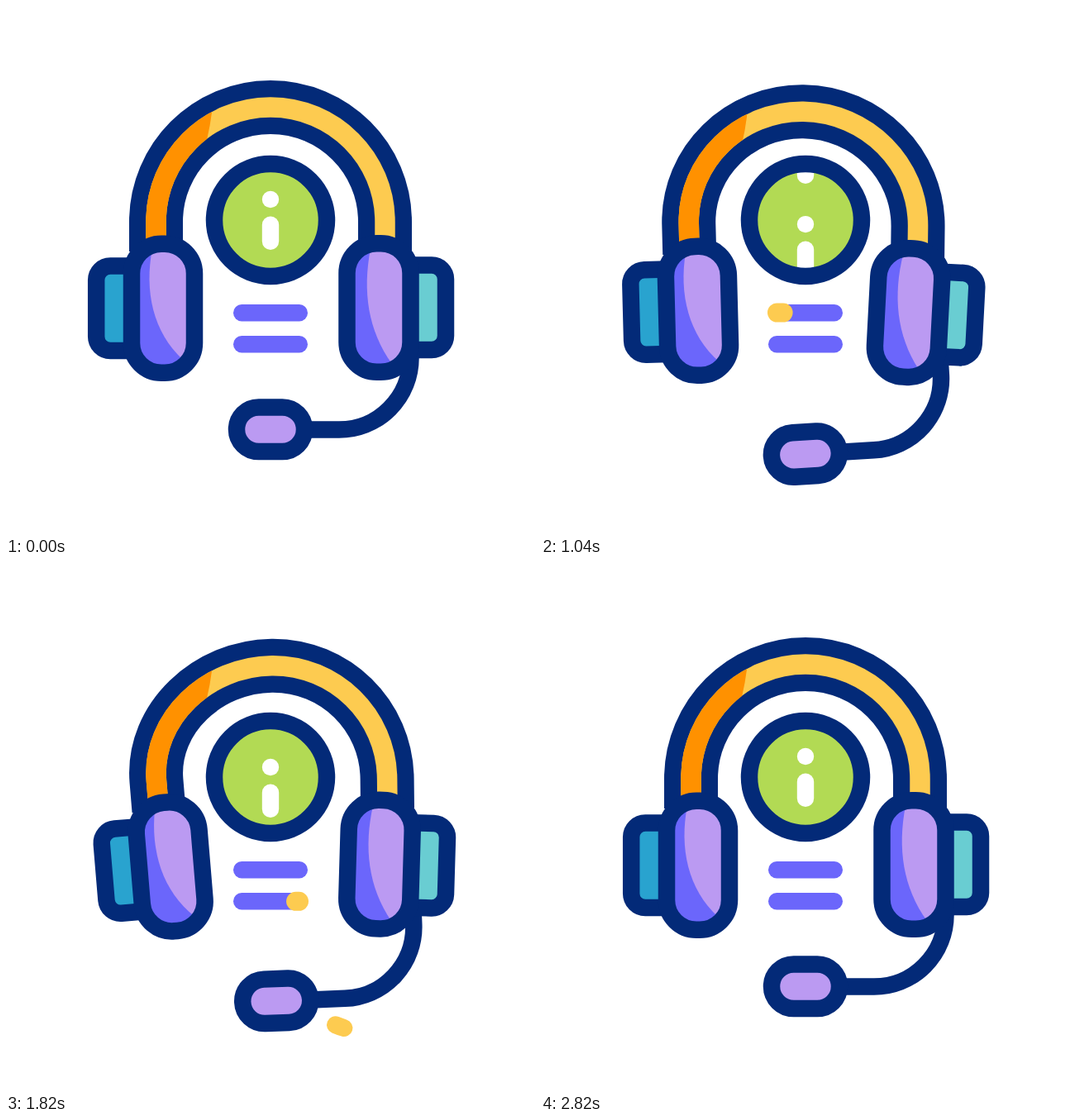
These frames come from a looping animation (640x640 px, 3.2 s). An HTML page:

```html
<!DOCTYPE html>
<html lang="en">
<head>
<meta charset="utf-8">
<title>Headset support</title>
<style>
html, body { margin: 0; width: 100%; height: 100%; overflow: hidden; background: #fff; }
svg { display: block; width: 100vw; height: 100vh; }
.ink { stroke: #032a78; stroke-width: 20.5; }
.none { fill: none; }
.violet { fill: #6b66fb; }
.lilac { fill: #bb9af2; }
.spark { fill: none; stroke: #fdcb50; stroke-width: 21; stroke-linecap: round; }
.wide { stroke-width: 23; }
</style>
</head>
<body>
<svg viewBox="0 0 640 640">
  <defs>
    <clipPath id="shade"><path id="shadeEdge" d="M0 0H255L249 129Q247 145 243 162L230 400H0Z"/></clipPath>
    <clipPath id="lens"><circle cx="320" cy="259" r="60"/></clipPath>
    <g id="letter" fill="#fff">
      <circle cx="320" cy="234" r="10.2"/>
      <rect x="309.8" y="254.5" width="20.4" height="40.5" rx="10.2"/>
    </g>
  </defs>

  <circle cx="320" cy="259" r="60" fill="#b2da54"/>
  <g clip-path="url(#lens)">
    <g id="scroll"><use href="#letter"/><use href="#letter" y="-110"/></g>
  </g>
  <circle class="ink none" cx="320" cy="259" r="68"/>
  <rect class="violet" x="275" y="361" width="90" height="20.4" rx="10.2"/>
  <rect class="violet" x="275" y="399" width="90" height="20.4" rx="10.2"/>
  <path id="line1" class="spark wide" pathLength="1" d="M285.5 371H354.5"/>
  <path id="line2" class="spark wide" pathLength="1" d="M285.5 409.3H354.5"/>

  <g id="mic">
    <path class="ink none" d="M489.5 400V426A86.5 86.5 0 0 1 403 512.5H362"/>
    <rect class="ink lilac" x="279" y="485.5" width="82" height="53.5" rx="26.7"/>
    <path id="spark1" class="spark" pathLength="1" d="M288 478L260 444"/>
    <path id="spark2" class="spark" pathLength="1" d="M267 497L224 483"/>
    <path id="spark3" class="spark" pathLength="1" d="M268 524L227 537"/>
  </g>

  <path id="band" class="none" stroke="#032a78" stroke-width="65"/>
  <path id="bandLight" class="none" stroke="#fdcb50" stroke-width="24.5"/>
  <g clip-path="url(#shade)"><path id="bandDark" class="none" stroke="#ff9100" stroke-width="24.5"/></g>

  <g id="left">
    <rect class="ink" fill="#29a3cf" x="109.2" y="314.5" width="60" height="102.5" rx="17"/>
    <rect class="violet" x="152" y="287.8" width="76" height="156" rx="36"/>
    <path class="lilac" d="M177 294C167 345 178 395 214 428L219 425V294Z"/>
    <rect class="ink none" x="152" y="287.8" width="76" height="156" rx="36"/>
  </g>
  <g id="right">
    <rect class="ink" fill="#69cdd2" x="472" y="313.5" width="60" height="102.5" rx="17"/>
    <rect class="violet" x="412.5" y="287.3" width="77" height="155.5" rx="36"/>
    <path class="lilac" d="M441 294C431 345 438 393 467 433L478 430L482 400V294Z"/>
    <rect class="ink none" x="412.5" y="287.3" width="77" height="155.5" rx="36"/>
  </g>

  <path id="swoosh1" class="spark" pathLength="1" d=""/>
  <path id="swoosh2" class="spark" pathLength="1" d=""/>
</svg>
<script>
const LOOP = 3200;
const $ = id => document.getElementById(id);
const rad = deg => deg * Math.PI / 180;

// time, then x, y, angle of the left cup, the right cup and the microphone
const poses = [
  [260, 0, 0, 0, 0, 0, 0, 0, 0, 0],
  [460, -.8, -16, -3.5, .6, -16, 2, -2, -8, -3.5],
  [560, 0, -22.5, -5, 1, -22.5, 2.5, 0, -8, -5],
  [800, 2.4, 6.2, -9.9, 7.5, -5, 2.8, 6, 22, -12],
  [1040, -2.7, 3.5, -1.5, -1, 7, 3, -5.5, 25, -3.5],
  [1310, -2, -22.5, 3, 0, -22.5, 1, 0, -6, 2],
  [1540, 2.4, 7.4, -7.2, 6.6, -3.8, 1, 7, 4, 3],
  [2140, -1.8, -1.7, -1, .5, 1.8, 2.5, 0, 21, -8.5],
  [2420, 0, 0, 0, 0, 0, 0, 0, 13, -5],
  [2790, 0, 0, 0, 0, 0, 0, 0, 0, 0]
];

const slope = (i, k) => (poses[i + 1][k] - poses[i][k]) / (poses[i + 1][0] - poses[i][0]);

// Tangent that never overshoots a key
function tangent(i, k) {
  if (i === 0 || i === poses.length - 1) return 0;
  const a = slope(i - 1, k), b = slope(i, k);
  return a * b <= 0 ? 0 : 2 * a * b / (a + b);
}

function pose(t) {
  const end = poses.length - 1;
  if (t <= poses[0][0]) return poses[0];
  if (t >= poses[end][0]) return poses[end];
  const i = poses.findIndex(p => p[0] > t) - 1;
  const p = poses[i], q = poses[i + 1], d = q[0] - p[0];
  const u = (t - p[0]) / d, v = 1 - u;
  return p.map((a, k) =>
    a * v * v * (1 + 2 * u) + q[k] * u * u * (3 - 2 * u) +
    d * u * v * (v * tangent(i, k) - u * tangent(i + 1, k)));
}

function ease(t, from, to) {
  const u = Math.min(1, Math.max(0, (t - from) / (to - from)));
  return (1 - Math.cos(Math.PI * u)) / 2;
}

function trim(id, t, headFrom, headTo, tailFrom, tailTo) {
  const el = $(id), on = t > headFrom && t < tailTo + 12;
  el.style.display = on ? '' : 'none';
  if (!on) return;
  const tail = Math.min(.998, ease(t, tailFrom, tailTo));
  const len = Math.max(.001, ease(t, headFrom, headTo) - tail);
  el.setAttribute('stroke-dasharray', len + ' 3');
  el.setAttribute('stroke-dashoffset', -tail);
}

function arc(id, cx, cy, r, from, to) {
  const at = a => `${cx + r * Math.cos(rad(a))} ${cy + r * Math.sin(rad(a))}`;
  $(id).setAttribute('d', `M${at(from)}A${r} ${r} 0 0 ${to > from ? 1 : 0} ${at(to)}`);
}

function place(id, x, y, angle, px, py) {
  $(id).setAttribute('transform', `translate(${x} ${y}) rotate(${angle} ${px} ${py})`);
}

function spin(px, py, a, x, y) {
  const c = Math.cos(rad(a)), s = Math.sin(rad(a));
  return [px + x * c - y * s, py + x * s + y * c];
}

// The left leg leans with its cup, the right leg with the whole band
function bandPath(lx, ly, la, rx, ry, ra) {
  const K = 76.5, LEG = 36;
  const tilt = Math.atan2(ry - ly, 292 + rx - lx) * 180 / Math.PI;
  const foot = spin(466 + rx, 261 + ry, ra, -7.5, LEG);
  const L = y => spin(174 + lx, 261 + ly, la, 7.5, y);
  const R = y => spin(...foot, tilt, 0, y - LEG);
  const midX = (L(0)[0] + R(0)[0]) / 2;
  const top = x => spin(midX, 122.5 + (ly + ry) / 2, tilt, x, 0);
  return `M${L(LEG)}L${L(0)}C${L(-K)} ${top(-K)} ${top(0)}C${top(K)} ${R(-K)} ${R(0)}L${foot}`;
}

function draw(now) {
  const t = now % LOOP;
  const [, lx, ly, la, rx, ry, ra, mx, my, ma] = pose(t);
  place('left', lx, ly, la, 174, 261);
  place('right', rx, ry, ra, 466, 261);
  place('mic', mx, my, ma, 403, 426);

  const d = bandPath(lx, ly, la, rx, ry, ra);
  for (const id of ['band', 'bandLight', 'bandDark']) $(id).setAttribute('d', d);
  $('shadeEdge').setAttribute('transform', `translate(0 ${(ly + ry) / 2})`);

  const roll = 233 * ease(t, 800, 1830) - 13 * ease(t, 1830, 2420);
  $('scroll').setAttribute('transform', `translate(0 ${roll % 110})`);

  trim('line1', t, 970, 1300, 1370, 1700);
  trim('line2', t, 1150, 1480, 1550, 1870);
  for (const n of [1, 2, 3]) trim('spark' + n, t, 375, 620, 560, 800);
  trim('swoosh1', t, 260, 560, 470, 845);
  trim('swoosh2', t, 1340, 1640, 1550, 1865);
  requestAnimationFrame(draw);
}

arc('swoosh1', 193, 427, 108.5, 179, 59);
arc('swoosh2', 441.5, 457.5, 110, -9, 113);
draw(performance.now());
</script>
</body>
</html>
```
